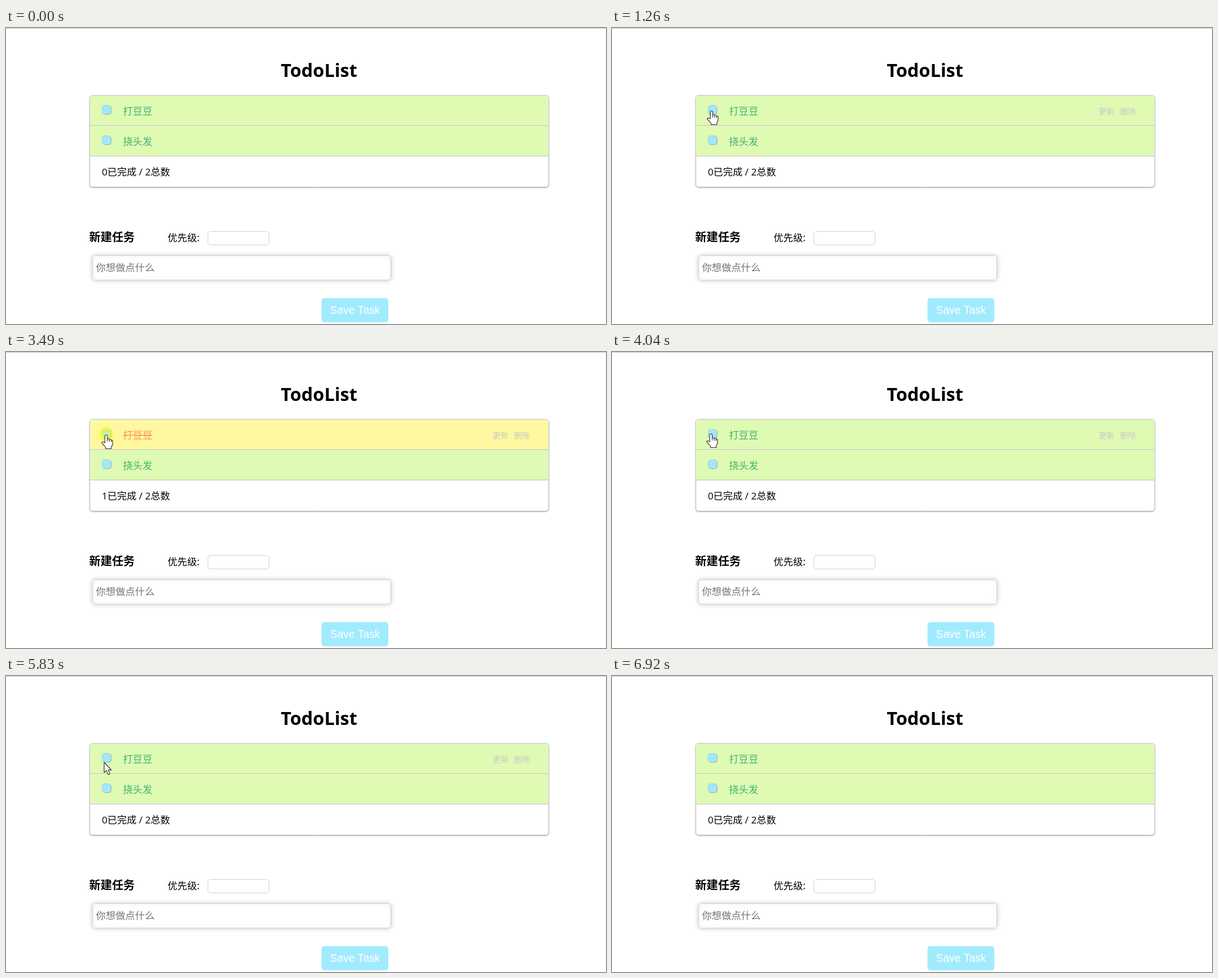
Recreate the animation shown at these times as an HTML page with a canvas. Size 1064 by 526 pixels, loop 7.7 s.

```html
<!DOCTYPE html>
<html lang="zh">
<head>
<meta charset="utf-8">
<title>TodoList</title>
<style>
html, body { margin: 0; width: 100%; height: 100%; overflow: hidden; background: #fff; }
canvas { display: block; }
</style>
</head>
<body>
<canvas id="stage" width="1064" height="526"></canvas>
<script>
const ctx = document.getElementById('stage').getContext('2d');
const LOOP = 7700;
const FONT = '"Open Sans", "Noto Sans CJK SC", "Noto Sans CJK", sans-serif';
const COLORS = { todo: '#dffab3', done: '#fff8a0', todoText: '#3cb371', doneText: '#ff9150',
  button: '#a1ebfe', line: '#bdbdbd', border: '#cdcdcd', link: '#c8c8c8' };

const smooth = p => p * p * (3 - 2 * p);
const linear = p => p;
const accelerate = p => p ** 5;

// Pointer moves: first step, last step, number of steps, destination, easing.
const START = [340, 530];
const MOVES = [
  [150, 850, 10, 173, 148, smooth],
  [930, 930, 1, 171, 147, linear],
  [1000, 1000, 1, 176, 147, linear],
  [1890, 1890, 1, 177, 147, linear],
  [3890, 3890, 1, 175, 145, linear],
  [4270, 4270, 1, 174, 150, linear],
  [4350, 4350, 1, 173, 154, linear],
  [4730, 5270, 8, 170, 169, smooth],
  [5440, 5830, 6, 173.5, 153, smooth],
  [5910, 6210, 5, 271, 336, accelerate],
  [6290, 6920, 9, 385, 530, linear]
];

function pointerAt(t) {
  if (t < MOVES[0][0]) return null;
  let [x, y] = START;
  for (const [first, last, steps, toX, toY, ease] of MOVES) {
    if (t < first) break;
    const gap = steps > 1 ? (last - first) / (steps - 1) : 1;
    const step = Math.min(steps, Math.floor((t - first) / gap + 0.07) + 1);
    const p = ease(step / steps);
    x += (toX - x) * p;
    y += (toY - y) * p;
    if (step < steps) break;
  }
  return y < 526 ? { x, y } : null;
}

function text(str, x, y, size, color = '#000', weight = 400, family = FONT, align = 'left') {
  ctx.font = `${weight} ${size}px ${family}`;
  ctx.fillStyle = color;
  ctx.textAlign = align;
  ctx.fillText(str, x, y);
}

function box(x, y, w, h, r, fill, stroke) {
  ctx.beginPath();
  ctx.roundRect(x, y, w, h, r);
  if (fill) { ctx.fillStyle = fill; ctx.fill(); }
  if (stroke) { ctx.strokeStyle = stroke; ctx.lineWidth = 1; ctx.stroke(); }
}

function withShadow(color, blur, offset, draw) {
  ctx.save();
  ctx.shadowColor = color;
  ctx.shadowBlur = blur;
  ctx.shadowOffsetY = offset;
  draw();
  ctx.restore();
}

function rect(x, y, w, h, color) {
  ctx.fillStyle = color;
  ctx.fillRect(x, y, w, h);
}

function checkbox(y) {
  box(170.8, y + 0.8, 16, 16, 5, '#7f8d90');
  box(170.5, y + 0.5, 15.5, 15.5, 4.5, '#a0e9fd', '#a8cdd2');
}

function row(y, label, done, hovered) {
  rect(149.5, y + 0.5, 812, 52.5, done ? COLORS.done : COLORS.todo);
  rect(149, y + 53, 813, 1, COLORS.line);
  checkbox(y + 17);
  const color = done ? COLORS.doneText : COLORS.todoText;
  text(label, 207.5, y + 34, 17.33, color);
  if (done) rect(207.5, y + 27.3, 52, 1.4, color);
  if (hovered) {
    text('更新', 863, y + 33, 14, COLORS.link);
    text('删除', 901, y + 33, 14, COLORS.link);
  }
}

function page(done, hoverY) {
  rect(0, 0, 1064, 526, '#fff');
  rect(0, 0, 1064, 1, '#c4c4c4');
  text('TodoList', 555, 87, 32.4, '#000', 700, '"Open Sans", sans-serif', 'center');

  withShadow('rgba(0,0,0,.3)', 2, 1, () => box(148.5, 119.5, 814, 163, 5, '#fff', COLORS.border));
  row(120, '打豆豆', done, hoverY >= 120 && hoverY < 174);
  row(174, '挠头发', false, hoverY >= 174 && hoverY < 228);
  text(`${done ? 1 : 0}已完成 / 2总数`, 170, 262, 17.2);

  text('新建任务', 147.5, 379, 20.2, '#000', 700);
  text('优先级:', 286.5, 379, 17.33);
  box(358, 361.5, 108.5, 24, 5, '#fff', '#cfcfcf');
  withShadow('rgba(0,0,0,.2)', 8, 0, () => box(153.5, 404.5, 529, 43.5, 5, '#fff', '#cdcdcd'));
  text('你想做点什么', 159.5, 432, 17.33, '#757575');
  box(559.5, 480, 118.5, 43, 5, COLORS.button);
  text('Save Task', 619, 508, 19.3, '#fff', 400, '"Liberation Sans", Arial, sans-serif', 'center');
}

function clickMark(x) {
  ctx.beginPath();
  ctx.arc(x, 146.5, 14.2, 0, Math.PI * 2);
  ctx.fillStyle = 'rgba(255,255,0,.45)';
  ctx.fill();
}

const ARROW = new Path2D('M0 0V18L4.1 14.4L7.2 21.7L10.2 20.4L7.2 13.4H12.8Z');
const HAND = new Path2D('M-2.2 14V2.2Q-2.2 0 0 0T2.2 2.2V7Q4.5 5.8 5.8 7.8Q8 6.8 9 9' +
  'Q11.6 8.6 11.6 11V16.5L9.4 21V24.3H-.8V22L-4 18L-7.3 14.6Q-8 12.8-6 12.3Q-4.5 12.3-2.2 14Z');
const KNUCKLES = new Path2D('M2.2 7V11.5M5.8 7.8V12M9 9V12.5');

function pointer({ x, y }) {
  const overCheckbox = x >= 170 && x <= 187 && y >= 137 && y < 152.5;
  ctx.save();
  ctx.translate(x + 0.5, y + 0.5);
  ctx.fillStyle = '#fff';
  ctx.strokeStyle = '#222';
  ctx.lineWidth = 1.1;
  ctx.lineJoin = 'round';
  const shape = overCheckbox ? HAND : ARROW;
  ctx.fill(shape);
  ctx.stroke(shape);
  if (overCheckbox) ctx.stroke(KNUCKLES);
  ctx.restore();
}

function draw(t) {
  const within = (from, to) => t >= from && t < to;
  const hover = pointerAt(t - 76);  // row links react one step late
  page(within(1640, 4040), hover ? hover.y : -1);
  if (within(1170, 1260)) clickMark(176.7);
  if (within(3490, 3650)) clickMark(177.5);
  const at = pointerAt(t);
  if (at) pointer(at);
}

const begin = performance.now();
function tick() {
  draw((performance.now() - begin) % LOOP);
  requestAnimationFrame(tick);
}
tick();
</script>
</body>
</html>
```
